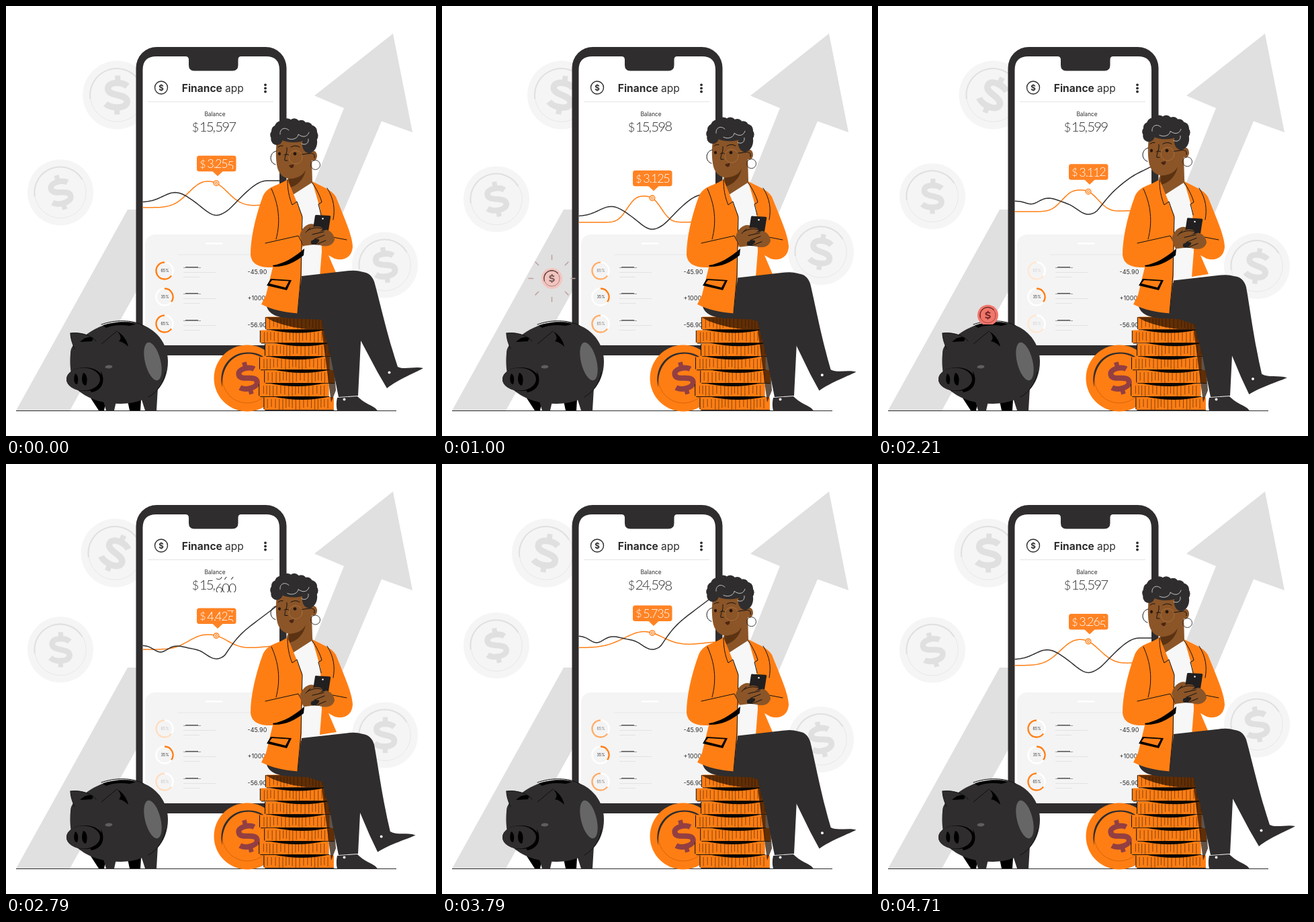
Write an HTML page that moves like this. It is 640 px wide and 640 px high and loops after 4780 ms.

```html
<!DOCTYPE html>
<html lang="en">
<head>
<meta charset="utf-8">
<title>Finance app</title>
<style>
html, body { margin: 0; width: 100%; height: 100%; overflow: hidden; background: #fff; }
svg { display: block; width: 100vw; height: 100vh; }
text { font-family: Inter, sans-serif; fill: #2f2d2e; }
.reel text { font-family: Lato, sans-serif; font-weight: 300; text-anchor: middle; }
#label text { fill: #fff; }
.line { fill: none; stroke: #111; stroke-width: 1; stroke-linecap: round; stroke-linejoin: round; }
.curl { fill: none; stroke: #e8e8e8; stroke-width: .8; stroke-linecap: round; }
</style>
</head>
<body>
<svg id="stage" viewBox="0 0 640 640" xmlns="http://www.w3.org/2000/svg"></svg>
<script>
const LOOP = 4780, INK = '#2f2d2e', ORANGE = '#ff7e14', SKIN = '#8b5528';
const TIMES = [0, 570, 1430, 2210, 2790, 3790, 4710];

// Smooth periodic interpolation that never overshoots its keys
function track(vals, t) {
  const n = TIMES.length;
  const v = j => vals[(j + n) % n];
  const at = j => TIMES[(j + n) % n] + LOOP * Math.floor(j / n);
  const slope = j => (v(j + 1) - v(j)) / (at(j + 1) - at(j));
  const tangent = j => {
    const a = slope(j - 1), b = slope(j);
    return a * b <= 0 ? 0 : 2 * a * b / (a + b);
  };
  let i = n - 1;
  while (TIMES[i] > t) i--;
  const h = at(i + 1) - at(i), s = (t - at(i)) / h, r = 1 - s;
  return v(i) * r * r * (1 + 2 * s) + v(i + 1) * s * s * (3 - 2 * s)
    + h * s * r * (tangent(i) * r - tangent(i + 1) * s);
}

const clamp = x => Math.max(0, Math.min(1, x));
const ramp = (t, a, b) => { const s = clamp((t - a) / (b - a)); return s * s * (3 - 2 * s); };
const mix = (a, b, k) => `rgb(${a.map((c, i) => Math.round(c + (b[i] - c) * k))})`;
const times = (n, make) => Array.from({ length: n }, (_, i) => make(i)).join('');
const path = (d, fill, more = '') => `<path d="${d}" fill="${fill}" ${more}/>`;
const line = (d, more = '') => `<path class="line" d="${d}" ${more}/>`;
const circle = (x, y, r, fill, more = '') => `<circle cx="${x}" cy="${y}" r="${r}" fill="${fill}" ${more}/>`;
const oval = (x, y, rx, ry, fill, turn = 0) =>
  `<ellipse cx="${x}" cy="${y}" rx="${rx}" ry="${ry}" fill="${fill}" transform="rotate(${turn} ${x} ${y})"/>`;
const rect = (x, y, w, h, r, fill) =>
  `<rect x="${x}" y="${y}" width="${w}" height="${h}" rx="${r}" fill="${fill}"/>`;
const dollar = color => `<g fill="none" stroke="${color}" stroke-width="9.5">
  <path d="M15.5 -13C8 -20 -13.5 -20.5 -13.5 -9.5C-13.5 3 15 -3 15 9.5C15 21 -9 20.5 -17 13"/>
  <path d="M1 -29V-17M0 17V29" stroke-width="8"/></g>`;

// Floating coins: place and tilt as waves of the loop angle a
const coins = [
  { r: 51, k: 1, x: a => 167 + 12 * Math.sin(a - .15), y: () => 132.5, tilt: a => 13 - 13 * Math.cos(a) },
  { r: 49, k: .9, x: () => 81, y: a => 279.3 + 9.2 * Math.sin(a - .2), tilt: a => -7.5 - 7.5 * Math.cos(a) },
  { r: 49, k: .92, x: () => 564, y: a => 389 - 23 * Math.sin(a + .15), tilt: a => -2 + 13 * Math.sin(a - .6) }
];

function greyCoin(c, i) {
  const q = c.r * .78;
  return `<g id="coin${i}">${circle(0, 0, c.r, '#f5f5f5')}
    ${circle(0, 0, q, 'none', 'stroke="#e8e8e8"')}
    <path d="M${-q} 6A${q} ${q} 0 0 1 ${q * .85} ${-q * .5}" fill="none" stroke="#e0e0e0" stroke-width="2"/>
    <g id="sign${i}">${dollar('#e0e0e0')}</g></g>`;
}

function gauge(y, percent, id) {
  const a = Math.PI * .2, x1 = 236 + 12.5 * Math.cos(a), y1 = y + 12.5 * Math.sin(a);
  const flags = percent > 50 ? '1 0' : '0 1';
  return `${circle(236, y, 12.5, 'none', 'stroke="#fff" stroke-width="2.6"')}
    <g id="${id}"><path d="M236 ${y - 12.5}A12.5 12.5 0 ${flags} ${x1} ${y1}" fill="none" stroke="${ORANGE}" stroke-width="2.4"/>
    <text x="236.5" y="${y + 2}" font-size="5.5" text-anchor="middle">${percent}%</text></g>`;
}

const row = (y, percent, amount, id) => `${gauge(y, percent, id)}
  <path d="M264 ${y - 4.5}H290" stroke="#777" stroke-width=".7"/>
  <path d="M267 ${y - 5.3}H286" stroke="${INK}" stroke-width=".9"/>
  <path d="M264 ${y + 2.5}H312M264 ${y + 9.5}H288" stroke="#ddd" stroke-width=".8"/>
  <text x="359.5" y="${y + 5}" font-size="9">${amount}</text>`;

const reel = (id, x, size) => `<g class="reel" font-size="${size}">
  <text id="${id}a" x="${x}"></text><text id="${id}b" x="${x}"></text></g>`;

const phone = `
  ${rect(193.5, 61, 224, 459, 31, INK)}
  ${path('M203.5 95Q203.5 75 224 75H267Q272 75 272 80V88Q272 96.5 280 96.5H337Q345.5 96.5 345.5 88V80Q345.5 75 350 75H387Q407 75 407 95V505H203.5Z', '#fff')}
  ${circle(231, 121.5, 9.5, 'none', `stroke="${INK}" stroke-width="1.4"`)}
  <text x="231" y="125.8" font-size="11.5" font-weight="700" text-anchor="middle">$</text>
  <text x="261.8" y="127.5" font-size="15.5"><tspan font-weight="700">Finance</tspan> app</text>
  ${times(3, i => circle(386, 117.3 + 5.1 * i, 1.9, INK))}
  <path d="M211 142.5H398" stroke="#e4e4e4"/>
  <text x="311" y="163.5" font-size="8.3" text-anchor="middle">Balance</text>
  <g clip-path="url(#balanceClip)">
    <g class="reel"><text x="282" y="186.5" font-size="18">$</text><text x="309.8" y="187" font-size="20">,</text></g>
    ${times(5, i => reel('b' + i, 337.3 - 10 * i - (i > 2 ? 3.7 : 0), 20.5))}
  </g>
  <g clip-path="url(#screen)">
    <path id="orangeCurve" fill="none" stroke="${ORANGE}" stroke-width="1.5"/>
    <path id="darkCurve" fill="none" stroke="${INK}" stroke-width="1.5"/>
    ${path('M207 505V357Q207 340 224 340H407V505Z', '#f4f4f4')}
  </g>
  <g id="dot">${circle(0, 0, 3.8, '#fff', `stroke="${ORANGE}" stroke-width="1.4"`)}${circle(0, 0, 1.6, 'none', `stroke="${ORANGE}" stroke-width="1.1"`)}</g>
  <g id="label">
    ${rect(284, 0, 58.5, 23.5, 3.5, '#ff8324')}${path('M307 23L315 30.5L323 23Z', '#ff8324')}
    <g clip-path="url(#labelClip)">
      <g class="reel"><text x="293" y="18" font-size="16">$</text><text x="310.8" y="18.5" font-size="18">.</text></g>
      ${times(4, i => reel('l' + i, 334.5 - 9.1 * i - (i > 2 ? 2.7 : 0), 18))}
    </g>
  </g>
  <path d="M298 353.5H321" stroke="#fff" stroke-width="2.6" stroke-linecap="round"/>
  <path d="M256 370H366" stroke="#e2e2e2" stroke-width=".8"/>
  ${row(394, 65, '-45.90', 'ringA')}${row(433, 35, '+1000', 'ringB')}${row(473, 65, '-56.90', 'ringC')}`;

const pig = `
  ${path('M125 582L138 602H146L149 588ZM181 588L184 602H200L201 586Z', '#000')}
  ${path('M143 582L149 602H161L165 584ZM199 577L207 602H224L226 568Z', INK)}
  ${path('M96 517C96 508 101 502 108 499C121 486 140 474 163 471C205 464 241 490 241 529C241 563 219 591 171 592C145 592 126 586 111 575C97 566 94 536 96 517Z', INK)}
  ${path('M124 570C138 570 145 561 141 543C148 556 145 572 127 575Z', '#000')}
  ${path('M96 487C111 485 127 490 134 499L113 505L102 510C99 502 96 494 96 487Z', INK)}
  ${path('M110 500C117 493 124 491 130 494L128 499Z', '#000')}
  ${line('M96 487C111 485 127 490 134 499M96 487C96 495 99 503 102 510')}
  ${path('M165 484C157 489 149 496 142 503C157 499 171 501 182 507C180 497 173 489 165 484Z', INK)}
  ${path('M165 484C174 489 180 497 182 507C178 503 174 500 168 499C173 495 170 488 165 484Z', '#000')}
  ${line('M165 484L142 503')}
  ${oval(117, 555.5, 27, 17.5, '#000')}${oval(115, 555.5, 25, 17, INK)}
  ${path('M103 547C100 553 101 564 106 563C108 558 108 549 103 547ZM115 546C112 553 112 564 119 565C122 558 121 547 115 546Z', '#000')}
  ${oval(153, 537, 5.5, 2.5, '#605e5f', -4)}${oval(218.5, 529, 11.5, 29, '#676666', -14)}
  ${line('M142 474C161 467 188 466 205 476M237 545C235 561 225 575 212 582', 'stroke-width="1.6"')}
  ${path('M144 475.5C157 470.5 181 469.5 193 473.5L184 476C171 474 158 475 149 479Z', '#000')}`;

function layer(i) {
  const x = 382.5 + 3.8 * Math.cos(Math.PI * i) - i * .4, y = 462.5 + i * 19.9, w = 104, m = x + w * .55;
  const ticks = times(18, k => `M${x + 6 + k * 5.3 + Math.sin(k * 7 + i * 3)} ${y + 3}v${14 + 2 * Math.sin(k * 5 + i)}`);
  const shade = i && path(`M${m - 45} ${y - 1}H${m + 42}Q${m} ${y + 9} ${m - 45} ${y - 1}Z`, '#0c0805');
  return `${rect(x, y, w, 19.5, 2, ORANGE)}
    <path d="${ticks}" stroke="#1b1009" stroke-width=".8" opacity=".65"/>
    ${line(`M${x} ${y + 1}V${y + 18}M${x + 2} ${y + 19.5}H${x + w}`)}${shade || ''}`;
}

const stack = `
  ${circle(359, 554, 49.5, ORANGE)}
  ${circle(359, 554, 37, 'none', 'stroke="#d46107" stroke-width=".9"')}
  ${path('M322 568C315 542 331 516 359 515.5C374 515 385 521 391 530C378 519 366 516 355 518C333 521 320 542 322 568Z', INK)}
  <g transform="translate(359.5 554) rotate(-14) scale(.84)">${dollar('#933f42')}</g>
  ${times(7, layer)}
  ${path('M386 463H485V480Q440 486 397 469ZM469 475L485 479L491 572L484 590Z', '#241000', 'opacity=".72"')}`;

const hair = times(11, k => {
  const a = 2.75 + k * .4;
  return circle(428 + 27 * Math.cos(a), 192 + 16 * Math.sin(a), 8.8 + Math.sin(k * 5), INK);
}) + oval(428, 190, 26, 13, INK) + oval(452, 204, 11, 15, INK, 10);

const head = `<g id="head">
  ${path('M423 246L418 262L431 294L458 290L456 262L455 226Z', SKIN)}
  ${path('M421 257C434 257 442 252 446 244C443 260 431 269 420 271Z', '#5b3313')}
  ${path('M403 198C402 212 401 222 403 236C405 250 413 257 424 257C440 255 449 243 453 230L455 200L438 190Z', SKIN)}
  ${oval(457.5, 223, 5.5, 7.5, SKIN)}${hair}
  <path class="curl" d="M408 191C407 183 415 179 421 185M419 197C427 201 435 196 435 191C443 197 449 194 451 188M440 205C446 208 451 204 450 198"/>
  ${line('M405 210Q408 207 412 208M424 210Q431 206 437 210', 'stroke-width="1.6"')}
  ${oval(407, 220, 2, 2.4, '#24160d')}${oval(430, 220, 2.4, 2.4, '#24160d')}
  ${line('M418 211C419 221 414 224 415 230L419 230', 'stroke-width=".8"')}
  ${line('M402 216C392 218 391 233 401 236M414 222Q417 219 421 222M440 221L455 219M456 220Q460 219 459 226', 'stroke-width=".7"')}
  ${circle(431, 225, 10, 'none', 'stroke="#b07a45" stroke-width=".7"')}
  ${path('M421 238C424 235.500 426 237 428 235C429 239 427 242 424 241Z', '#4e2512')}
  ${circle(460.5, 236.5, 7, 'none', `stroke="${INK}" stroke-width=".9"`)}</g>`;

const jacket = `
  ${path('M427 281L455 263L469 300L474 365L467 412H436L440 320Z', '#f7f7f7')}
  ${path('M456 261C468 268 485 273 491 284C503 314 515 340 516 358C515 374 503 380 489 376L480 371L492 399L467 403L470 365L468 304Z', ORANGE)}
  ${path('M419 258C405 268 389 267 382 284C371 314 364 346 364 370C365 384 377 390 397 389L387 430L380 444C395 452 416 456 434 457.5L440 402L440 365L441 312Z', ORANGE)}
  ${path('M397 386C412 384 430 374 444 361L443 371C430 382 413 389 398 388Z', '#000')}
  ${path('M384 351L435 342L443 357C426 372 407 384 387 388Z', ORANGE)}
  ${line('M386 353L435 342L443 357M395 272C406 296 409 321 402 347M419 259C419 272 421 284 426 296L433 291L441 314L439 401L434 457M456 263C463 274 468 284 470 292L465 295L469 311M478 271C488 287 490 302 487 318M486 344L507 348', 'stroke-width=".8"')}
  ${path('M394 406L425 408L418 423L388 416Z', '#000')}${path('M396 408L421 409.5L416 419L392 413Z', ORANGE)}`;

const hands = `<g id="hands">
  ${path('M437 342C440 329 450 322 459 325L463 337L459 355L443 357Z', SKIN)}
  ${path('M460 312Q460.5 310.5 463 311L481 312Q484 312 483 315L477 353Q476 356 472 356L456 355Q453 354 454 351Z', '#211f20')}
  ${circle(471.5, 316.5, 1.2, '#fff')}
  ${path('M448 334C457 327 466 327 470 330C474 333 466 337 459 338L477 333C483 334 489 341 489 348C486 358 475 360 462 354C468 350 468 346 460 347L444 354Z', SKIN)}
  ${line('M449 334C457 330 463 329 470 331M456 340L473 336M459 347L474 341M464 354L476 349M453 330L446 337', 'stroke="#4e2812"')}</g>`;

const legs = `
  ${path('M493 583C491 592 492 598 493 602.5H553C549 595 536 594 523 581Z', INK)}
  ${path('M470 440L471 473C474 491 482 511 485 532L495 582L524 580L529 480L528 430Z', INK)}
  ${path('M387 444C390 458 401 463 421 465L478 467L520 440L438 410L434 457Q409 454 387 444Z', INK)}
  ${circle(503.5, 585.5, 2, '#f0f0f0')}`;
const upperLeg = `<g id="thigh">${path('M440 402L511 394Q545 391 546 420L525 470L470 467L434 455Z', INK)}</g>
  <g id="shin">${path('M505 412C520 391 541 391 548 410C555 434 567 489 583 537C593 542 608 536 621 539C613 544 583 556 567 569L553 545L528 498L520 455Z', INK)}
  ${circle(570.5, 545.5, 2, '#fff')}</g>`;

const savedCoin = `<g id="rays" transform="translate(163.5 405.5)" stroke-width="1.5" stroke-linecap="round">
  ${times(8, i => `<path class="ray" transform="rotate(${i * 45})"/>`)}</g>
  <g clip-path="url(#slot)"><g id="drop"><circle id="dropFace" r="15.5"/>
  <path id="dropRing" d="M-11 4A11.7 11.7 0 0 1 9 -7.5" fill="none" stroke-width="1.3"/>
  <circle id="dropRim" r="11.6" fill="none" stroke-width=".6"/>
  <g id="dropSign" transform="scale(.22)">${dollar('currentColor')}</g></g></g>`;

const stage = document.getElementById('stage');
stage.innerHTML = `<defs>
  <clipPath id="screen"><rect x="203.5" y="150" width="203.5" height="355"/></clipPath>
  <clipPath id="balanceClip"><rect x="270" y="168" width="85" height="23"/></clipPath>
  <clipPath id="labelClip"><rect x="286" y="3.5" width="55" height="16.5"/></clipPath>
  <clipPath id="slot"><rect x="120" y="360" width="90" height="114"/></clipPath></defs>
  ${path('M15 602L181 303H262L95 602ZM576 41L605 188L559 171.5L491 332H431L503 152L459 133.5Z', '#e0e0e0')}
  ${coins.map(greyCoin).join('')}
  ${phone}${pig}${savedCoin}
  <path d="M15 602.5H581" stroke="${INK}"/>
  ${stack}${legs}${head}${jacket}${upperLeg}${hands}`;

const $ = {};
stage.querySelectorAll('[id]').forEach(e => $[e.id] = e);
const rayPaths = stage.querySelectorAll('.ray');
const set = (id, name, value) => $[id].setAttribute(name, value);
const move = (id, value) => set(id, 'transform', value);

const bell = (x, mid, width, power = 2) => Math.exp(-Math.pow(Math.abs(x - mid) / width, power));
const rise = (x, a, b) => ramp(x, a, b);

function orangeAt(t, a) {
  const top = track([261, 274, 288, 274, 254, 249.5, 261.3], t);
  const depth = track([39, 39, 39, 32, 22, 24, 38.5], t);
  const narrow = clamp(.45 + .5 * Math.sin(a - .3));
  return x => top + depth * (1 - bell(x, 301, 42 - 14 * narrow, 2 + narrow)) - 9 * (1 - narrow) * rise(x, 330, 420);
}

// A wave that turns into a climb and back, hung on its lowest point
function darkAt(t) {
  const low = track([311, 327, 334, 310, 290, 276, 310], t);
  const climb = ramp(t, 1300, 2800) - ramp(t, 3800, 4650);
  const wave = x => -19 - 14.5 * bell(x, 252, 26) + 19.5 * bell(x, 313, 25) - 32 * rise(x, 328, 388);
  const up = x => -20 + 10 * bell(x, 230, 14) + 3 * bell(x, 274, 14) + 20 * bell(x, 313, 24) - .75 * Math.max(0, x - 325);
  return x => low + wave(x) * (1 - climb) + up(x) * climb;
}

const trace = f => 'M' + Array.from({ length: 70 }, (_, i) => `${203 + i * 3} ${f(203 + i * 3).toFixed(2)}`).join('L');

// Odometer: a digit turns only while every lower digit passes from 9 to 0
function odometer(id, value, digits, base, pitch) {
  for (let i = 0; i < digits; i++) {
    const unit = 10 ** i, n = Math.floor(value / unit);
    const turn = Math.max(0, value - n * unit - unit + 1);
    [['a', n, -turn], ['b', n + 1, 1 - turn]].forEach(([half, digit, shift]) => {
      $[id + i + half].textContent = digit % 10;
      set(id + i + half, 'y', base + shift * pitch);
    });
  }
}

function drawSaved(t) {
  const warm = clamp((t - 570) / 1150), dark = mix([125, 120, 120], [112, 40, 36], warm);
  const fall = Math.max(0, (t - 1650) / 560), burst = (t - 570) / 860;
  move('drop', `translate(163.5 ${405.5 + 54.5 * fall * fall})`);
  set('drop', 'opacity', t > 2600 ? 0 : clamp((t - 300) / 250));
  set('dropFace', 'fill', mix([244, 242, 241], [241, 118, 107], warm));
  set('dropRing', 'stroke', mix([50, 48, 48], [100, 38, 35], warm));
  set('dropRim', 'stroke', dark);
  set('dropSign', 'color', dark);
  set('rays', 'opacity', Math.min(clamp((t - 420) / 130), clamp((1720 - t) / 220)));
  set('rays', 'stroke', mix([255, 255, 255], [130, 65, 60], clamp(burst)));
  rayPaths.forEach(e => e.setAttribute('d', `M0 ${-22 - 12 * burst}V${-32 - 5 * burst}`));
}

function draw(t) {
  const a = t / LOOP * 2 * Math.PI;
  coins.forEach((c, i) => {
    move('coin' + i, `translate(${c.x(a)} ${c.y(a)})`);
    move('sign' + i, `rotate(${c.tilt(a)}) scale(${c.k})`);
  });

  const orange = orangeAt(t, a), peak = orange(313);
  set('orangeCurve', 'd', trace(orange));
  set('darkCurve', 'd', trace(darkAt(t)));
  move('dot', `translate(313 ${peak})`);
  move('label', `translate(0 ${peak - 41})`);
  odometer('b', track([15597, 15597.75, 15598.3, 15599, 15599.7, 24598, 15597], t), 5, 187, 20);
  odometer('l', track([3255, 3154, 3112.3, 3112, 4423, 5735, 3265], t), 4, 18.5, 17);

  const fade = .12 + .88 * Math.abs(1 - 2 * t / LOOP);
  set('ringA', 'opacity', fade);
  set('ringC', 'opacity', fade);
  drawSaved(t);

  const sway = .5 - .5 * Math.cos(a);
  move('head', `translate(0 ${-4.8 * sway})`);
  move('hands', `translate(0 ${4.5 * sway})`);
  move('thigh', `translate(0 ${6.5 * sway})`);
  move('shin', `translate(0 ${6 * sway}) rotate(${5.3 * sway} 525 410)`);
}

function tick(now) {
  draw(now % LOOP);
  requestAnimationFrame(tick);
}
draw(0);
requestAnimationFrame(tick);
</script>
</body>
</html>
```
